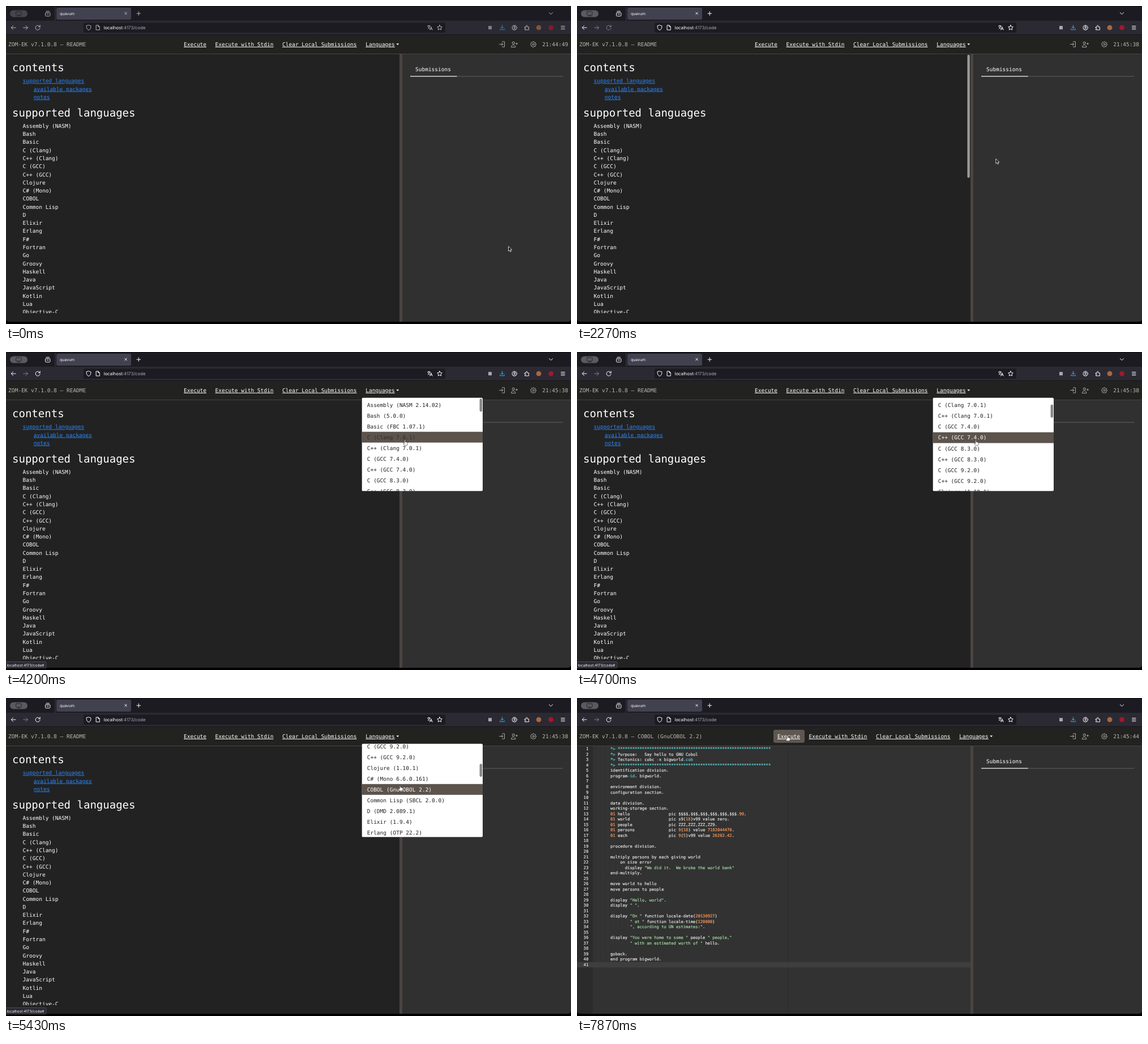
Animation, 998 px wide and 561 px high, one loop 8 s. Source, as an HTML page:

```html
<!DOCTYPE html>
<html lang="en">
<head>
<meta charset="utf-8">
<title>Code runner</title>
<style>
html, body { margin: 0; width: 100%; height: 100%; overflow: hidden; background: #000; }
svg { display: block; width: 998px; height: 561px; }
text { white-space: pre; text-rendering: geometricPrecision; fill: #fff; }
.mono { font: 9.515px "DejaVu Sans Mono", monospace; }
.big { font-size: 19.03px; }
.code { font: 7.137px "DejaVu Sans Mono", monospace; stroke-width: .2; }
.code text { fill: #e6e6e6; stroke: #e6e6e6; }
.code .op { fill: #5fd3d8; stroke: #5fd3d8; }
.code .num { fill: #ff9a5c; stroke: #ff9a5c; }
.code .str { fill: #a3d9a3; stroke: #a3d9a3; }
.ui { font-family: Inter, sans-serif; }
.u { text-decoration: underline; }
.link { fill: #2b86f8; text-decoration: underline; }
.ic { fill: none; stroke: #fbfbfe; stroke-width: 1; stroke-linecap: round; stroke-linejoin: round; }
.soft { fill: #bdb8ae; }
</style>
</head>
<body>
<svg id="stage" viewBox="0 0 998 561" xmlns="http://www.w3.org/2000/svg"></svg>
<script>
const LOOP = 8000, ROW = 19.03, ADV = 4.297, LINE = 9.515;
const APP = 'ZOM-EK v7.1.0.8 – ';

const readme = ['Assembly (NASM)', 'Bash', 'Basic', 'C (Clang)', 'C++ (Clang)', 'C (GCC)', 'C++ (GCC)',
  'Clojure', 'C# (Mono)', 'COBOL', 'Common Lisp', 'D', 'Elixir', 'Erlang', 'F#', 'Fortran', 'Go', 'Groovy',
  'Haskell', 'Java', 'JavaScript', 'Kotlin', 'Lua', 'Objective-C'];

const menu = ['Assembly (NASM 2.14.02)', 'Bash (5.0.0)', 'Basic (FBC 1.07.1)', 'C (Clang 7.0.1)',
  'C++ (Clang 7.0.1)', 'C (GCC 7.4.0)', 'C++ (GCC 7.4.0)', 'C (GCC 8.3.0)', 'C++ (GCC 8.3.0)',
  'C (GCC 9.2.0)', 'C++ (GCC 9.2.0)', 'Clojure (1.10.1)', 'C# (Mono 6.6.0.161)', 'COBOL (GnuCOBOL 2.2)',
  'Common Lisp (SBCL 2.0.0)', 'D (DMD 2.089.1)', 'Elixir (1.9.4)', 'Erlang (OTP 22.2)',
  'F# (.NET Core SDK 3.1.202)', 'Fortran (GFortran 9.2.0)'];

const stars = '*> ' + '*'.repeat(63);
const program = `${stars}
*> Purpose:   Say hello to GNU Cobol
*> Tectonics: cobc -x bigworld.cob
${stars}
identification division.
program-id. bigworld.

environment division.
configuration section.

data division.
working-storage section.
01 hello                pic $$$$,$$$,$$$,$$$,$$$,$$$.99.
01 world                pic s9(18)v99 value zero.
01 people               pic ZZZ,ZZZ,ZZZ,ZZ9.
01 persons              pic 9(18) value 7182044470.
01 each                 pic 9(5)v99 value 26202.42.

procedure division.

multiply persons by each giving world
    on size error
      display "We did it.  We broke the world bank"
end-multiply.

move world to hello
move persons to people

display "Hello, world".
display " ".

display "On " function locale-date(20130927)
        " at " function locale-time(120000)
        ", according to UN estimates:".

display "You were home to some " people " people,"
        " with an estimated worth of " hello.

goback.
end program bigworld.
`.split('\n');

const text = (x, y, s, cls = '', more = '') => `<text x="${x}" y="${y}" class="${cls}" ${more}>${s}</text>`;
const rect = (x, y, w, h, fill, more = '') => `<rect x="${x}" y="${y}" width="${w}" height="${h}" fill="${fill}" ${more}/>`;
const path = (d, more = '') => `<path d="${d}" ${more}/>`;
const circle = (x, y, r, more = '') => `<circle cx="${x}" cy="${y}" r="${r}" ${more}/>`;

const TOKENS = /("[^"]*")|(\*> \*+|\*>|-id|\.cob| -(?=x))|(\b\d+(?:\.\d+)?|\.\d+)/g;
const paint = s => s.replace(TOKENS, (m, str, op) =>
  `<tspan class="${str ? 'str' : op ? 'op' : 'num'}">${m}</tspan>`);

function gear(x, y) {
  let d = '';
  for (let i = 0; i < 32; i++) {
    const a = i * Math.PI / 16, r = i % 4 < 2 ? 5 : 3.9;
    d += `${i ? 'L' : 'M'}${(x + r * Math.cos(a)).toFixed(2)} ${(y + r * Math.sin(a)).toFixed(2)}`;
  }
  return path(d + 'Z') + circle(x, y, 1.6);
}

function browser() {
  return rect(0, 0, 998, 27, '#1c1b22') + rect(0, 26, 998, 25, '#2b2a33') + rect(0, 0, 998, 1, '#0c0c10') +
    rect(86.5, 2, .8, 24, '#4a4a58') + rect(89, 3, 132, 21, '#42414f', 'rx="2.5"') +
    rect(137, 29.5, 639, 17.5, '#1c1b22', 'rx="2.5"') + rect(0, 50, 998, .8, '#111') +
    `<g class="ui">${text(95, 15.9, 'quavum', '', 'font-size="6.9"')}
      <text x="172.5" y="41" font-size="7.8">localhost<tspan fill="#a9a9b2">:4173/code</tspan></text></g>
    <g id="chrome">${rect(7, 7.5, 31, 12, '#5a5a60', 'rx="6"')}
      <g class="ic" style="stroke:#26262c">${rect(17.5, 10, 9.5, 6, 'none', 'rx="1"')}${path('M20 17.5h5')}</g>
      <g class="ic">
      ${rect(69.5, 11.5, 8.4, 6.3, 'none', 'rx="1.2"')}${path('M71 9.3h5.4M72 14.2h3.4')}
      ${path('M209.8 11.2l3.6 3.6m0-3.6l-3.6 3.6M231 13.2h6.6m-3.3-3.3v6.6M959.2 11.6l3.2 3 3.2-3')}
      ${path('M17 38.2H9.2m3.4-3.4l-3.4 3.4 3.4 3.4')}
      ${path('M30.6 38.2h7.8m-3.4-3.4l3.4 3.4-3.4 3.4', 'id="fwd"')}
      ${path('M59.6 36.2a4 4 0 1 0 .5 2.6M60.2 33.9v2.8h-2.8', 'id="reload"')}
      ${path('M146 33.8l3.9 1.3c.2 4-1 6.4-3.9 7.5c-2.9-1.1-4.1-3.5-3.9-7.5z')}
      ${path('M159.5 34h3.3l2.5 2.5v5.7h-5.8zM162.8 34v2.5h2.5')}
      ${path('M744.5 35.3h5M747 34v1.3M745.3 40c2-1.2 3-2.6 3.3-4.7M745.5 37c.8 1.5 1.7 2.3 2.7 2.8M748.7 42.2l2.2-5.4 2.2 5.4M749.5 40.5h2.8')}
      ${path('M766 33.7l1.3 2.8 3 .4-2.2 2.1.6 3.1-2.7-1.5-2.7 1.5.6-3.1-2.2-2.1 3-.4z')}
      ${rect(852, 35.2, 6, 6, '#a9a9b2', 'stroke="none"')}
      ${path('M876.5 34v5.2m-2.4-2.2l2.4 2.4 2.4-2.4M872.8 40v1.8h7.4V40', 'style="stroke:#2bb3ee"')}
      ${circle(898.2, 38.2, 4.1)}${circle(898.2, 37, 1.4)}${path('M895.8 41.2c.8-2 4-2 4.8 0')}
      ${path('M916.5 37h2.2c-.9-3.8 3-3.8 2.2 0h2.5v5h-6.9v-1.5c2 .5 2-2.4 0-2z')}
      ${path('M980.5 35.5h6.4M980.5 38.2h6.4M980.5 40.9h6.4')}</g>
      ${circle(941, 38.2, 4.4, 'fill="#a8683f"')}${circle(962.5, 38.2, 4.4, 'fill="#a3182b"')}</g>`;
}

function header() {
  return rect(0, 51, 998, 33.5, '#222221') + rect(0, 84, 998, 1, '#474544') +
    text(4, 70.9, '', 'mono soft', 'id="title"') +
    `<g id="nav" class="mono">${rect(307, 56, 55, 23, '#5f5751', 'rx="3.5" id="runHover"')}
      ${rect(628.5, 56, 73.5, 23, '#5f5751', 'rx="3.5" id="langHover"')}
      ${text(314, 70.9, 'Execute', 'u')}${text(369.5, 70.9, 'Execute with Stdin', 'u')}
      ${text(488, 70.9, 'Clear Local Submissions', 'u')}${text(635.3, 70.9, 'Languages', 'u')}
      ${path('M689.3 66.3h5l-2.5 2.6z', 'fill="#fff"')}</g>
    <g class="ic" style="stroke:#bdb8ae;stroke-width:.9">
      ${path('M871.5 67.5h6.3m-2.3-2.3l2.3 2.3-2.3 2.3M876.5 62.9h4v9.2h-4')}
      ${circle(896.2, 65.1, 2)}${path('M892.5 72.2c0-5 7.4-5 7.4 0zM900.5 66.5h3M902 65v3')}
      ${gear(931.4, 67.7)}</g>` +
    text(947.2, 70.9, '', 'mono soft', 'id="clock"');
}

function readmePane() {
  const list = readme.map((s, i) => text(29.6, (214.9 + i * 14.273).toFixed(2), s)).join('');
  return `<g id="readme" class="mono">${rect(0, 85, 695, 472, '#222222')}
    <g clip-path="url(#fold)">${text(11, 114.8, 'contents', 'big')}
    ${text(29.6, 135.3, 'supported languages', 'link')}${text(48.8, 149.6, 'available packages', 'link')}
    ${text(48.8, 163.9, 'notes', 'link')}${text(11, 194.8, 'supported languages', 'big')}${list}</g>
    ${rect(689.5, 86, 4.3, 217, '#9c9c9c', 'rx="2.1" id="paneBar"')}</g>`;
}

function editor() {
  const y = i => (92.4 + i * LINE).toFixed(2);
  const nums = program.map((s, i) => text(20.2, y(i), i + 1, '', 'text-anchor="end"')).join('');
  const lines = program.map((s, i) => s && text((29 + 7 * ADV).toFixed(2), y(i), paint(s))).join('');
  let guides = '';
  program.forEach((s, i) => {
    const depth = 7 + s.search(/\S|$/);
    if (i < 40) for (let c = 2; c < depth; c += 2)
      guides += `M${(29 + c * ADV).toFixed(1)} ${(85.2 + i * LINE).toFixed(1)}v${LINE}`;
  });
  return `<g id="editor">${rect(0, 85, 695, 472, '#323232')}${rect(0, 85, 28, 472, '#2b2b2b')}
    ${rect(372.2, 85, .8, 472, '#282828')}
    <g id="source" class="code">${rect(0, 465.8, 695, LINE, '#3e3e3e')}
    ${path(guides, 'stroke="#555" stroke-width=".6" stroke-dasharray=".7 1.2"')}
    ${nums}${lines}${rect(29.5, 465.8, 1, LINE, '#ccc', 'id="caret"')}</g></g>`;
}

function dropdown() {
  const rows = menu.map((s, i) => text(637.7, (98.1 + i * ROW).toFixed(2), s, 'item')).join('');
  return `<g id="menu" class="mono" clip-path="url(#box)">${rect(628.5, 80.5, 213.5, 165, '#fff')}
    <g id="rows">${rect(628.5, 85.2, 213.5, ROW, '#5c534d', 'id="rowHover"')}${rows}</g>
    ${rect(836.6, 82, 4.4, 23, '#858585', 'rx="2.2" id="menuBar"')}</g>`;
}

const pointers = `<g id="arrow">${path('M0 0v8.3l1.9-1.7 1.3 3 1.6-.7-1.3-2.9h2.6z', 'fill="#111" stroke="#fff" stroke-width=".8"')}</g>
  <g id="hand">${path('M-.7 .4c0-1.2 1.5-1.2 1.5 0v2.6c.4-.7 1.4-.5 1.5.2c.5-.5 1.3-.2 1.4.5c.6-.4 1.2 0 1.2.7c0 2-.3 3.3-1.1 4.4H-.6c-.9-1.3-1.7-2.3-2.4-3.4c-.3-.9.7-1.3 1.3-.6l1 .9z', 'fill="#fff" stroke="#222" stroke-width=".6"')}</g>
  <g id="beam">${path('M-2.2-4.8q1.8 0 2.2 1q.4-1 2.2-1M-2.2 4.8q1.8 0 2.2-1q.4 1 2.2 1M0-3.8v7.6M-1.2 1h2.4', 'fill="none" stroke="#fff" stroke-width="1.1"')}</g>`;

const stage = document.getElementById('stage');
stage.innerHTML = `<defs><clipPath id="fold">${rect(0, 85, 690, 457, '#000')}</clipPath>
  <clipPath id="box">${rect(628.5, 80.5, 213.5, 165, '#000', 'rx="2.5"')}</clipPath></defs>` +
  rect(0, 0, 998, 561, '#000') + browser() + rect(699, 85, 299, 472, '#303030') +
  rect(695, 85, 5, 472, '#4a4442') + text(723, 114.9, 'Submissions', 'mono') +
  rect(714, 123.7, 270, .8, '#6a6a6a') + rect(714, 123.5, 82.5, 1.1, '#fff') +
  readmePane() + editor() + header() + dropdown() +
  rect(992.5, 51, 4, 471, '#1e1e1e', 'rx="2" stroke="#5e5e5e" stroke-width=".7" id="pageBar"') +
  path('M0 552v5h5a5 5 0 0 1-5-5zM998 552v5h-5a5 5 0 0 0 5-5z', 'fill="#000"') +
  `<g id="status" class="ui">${rect(-2, 546.5, 73, 11, '#2b2a33', 'rx="1.5" stroke="#5b5b66" stroke-width=".7"')}
    ${text(1.5, 554.6, 'localhost:4173/code#', '', 'font-size="6.5"')}</g>
  <g id="pointer">${pointers}</g>`;

const $ = id => document.getElementById(id);
const items = [...document.querySelectorAll('.item')];
const clamp = v => Math.max(0, Math.min(1, v));
const ramp = (t, a, b) => clamp((t - a) / (b - a));
const ease = k => k * k * (3 - 2 * k);
const fade = (id, v) => $(id).setAttribute('opacity', v);
const show = (id, on) => { $(id).style.display = on ? '' : 'none'; };
const put = (id, x, y) => $(id).setAttribute('transform', `translate(${x.toFixed(2)} ${y.toFixed(2)})`);

// [time, x, y] of the pointer's hot spot
const track = [[370, 887.5, 424], [700, 884.5, 428.5], [1600, 884.5, 428.5], [2370, 733, 262], [2470, 733, 262],
  [3120, 668.5, 67], [3300, 668.5, 67], [4070, 704.5, 156], [4670, 704.5, 156], [5300, 696, 155],
  [5500, 696, 155], [5830, 452, 188], [7200, 452, 188], [7620, 384, 46], [7850, 371.5, 67]];

function pointerAt(t) {
  let i = 0;
  while (i < track.length - 2 && t > track[i + 1][0]) i++;
  const [a, x, y] = track[i], [b, u, v] = track[i + 1], k = ease(ramp(t, a, b));
  return [x + (u - x) * k, y + (v - y) * k];
}

function draw(t) {
  const coding = t >= 5440, open = t >= 3200 && !coding;
  const [x, y] = pointerAt(t);

  const focus = ramp(t, 370, 700), loading = t >= 1600 && t < 2480;
  fade('chrome', .68 + .32 * focus);
  fade('fwd', t < 1600 ? 1 : .4);
  fade('reload', loading ? .4 : 1);

  $('title').textContent = APP + (coding ? 'COBOL (GnuCOBOL 2.2)' : 'README');
  $('clock').textContent = '21:' + (t < 1600 ? '44:49' : t < 5440 ? '45:38' : t < 7500 ? '45:42' : '45:44');
  put('nav', coding ? 40 : 0, 0);
  fade('langHover', coding ? 0 : .9 * ramp(t, 3000, 3100) - .75 * ramp(t, 3150, 3230) - .15 * ramp(t, 3300, 3400));
  fade('runHover', ramp(t, 7720, 7850));

  show('readme', !coding);
  fade('paneBar', t < 1700 ? 0 : 1 - ramp(t, 2500, 2750));
  show('editor', coding);
  show('source', t >= 5530);
  show('caret', t < 6800 || (t >= 7000 && t < 7500));
  fade('pageBar', coding ? 1 - ramp(t, 6240, 6370) : 0);

  const scroll = 57 * ease(ramp(t, 4165, 4530)) + 123.8 * ease(ramp(t, 4670, 5340));
  const row = open && y > 80.5 ? Math.floor((y + scroll - 85.2) / ROW) : -1;
  show('menu', open);
  put('rows', 0, -scroll);
  put('menuBar', 0, scroll * .188);
  fade('menuBar', .06 + .94 * ramp(t, 3230, 3450));
  show('rowHover', row >= 0);
  $('rowHover').setAttribute('y', 85.2 + row * ROW);
  const lit = Math.round(45 + 210 * ramp(t, 4210, 4360));
  items.forEach((el, i) => { el.style.fill = i === row ? `rgb(${lit},${lit},${lit})` : '#222'; });
  show('status', t >= 3600 && t < 5530);

  const beam = t >= 5560 && t < 7400;
  const hand = !beam && ((t >= 2980 && t < 5560 && (y < 79 || row >= 0)) || t >= 7720);
  put('pointer', x, y);
  show('beam', beam);
  show('hand', hand);
  show('arrow', !beam && !hand);
}

const start = performance.now();
function tick() {
  draw((performance.now() - start) % LOOP);
  requestAnimationFrame(tick);
}
tick();
</script>
</body>
</html>
```
